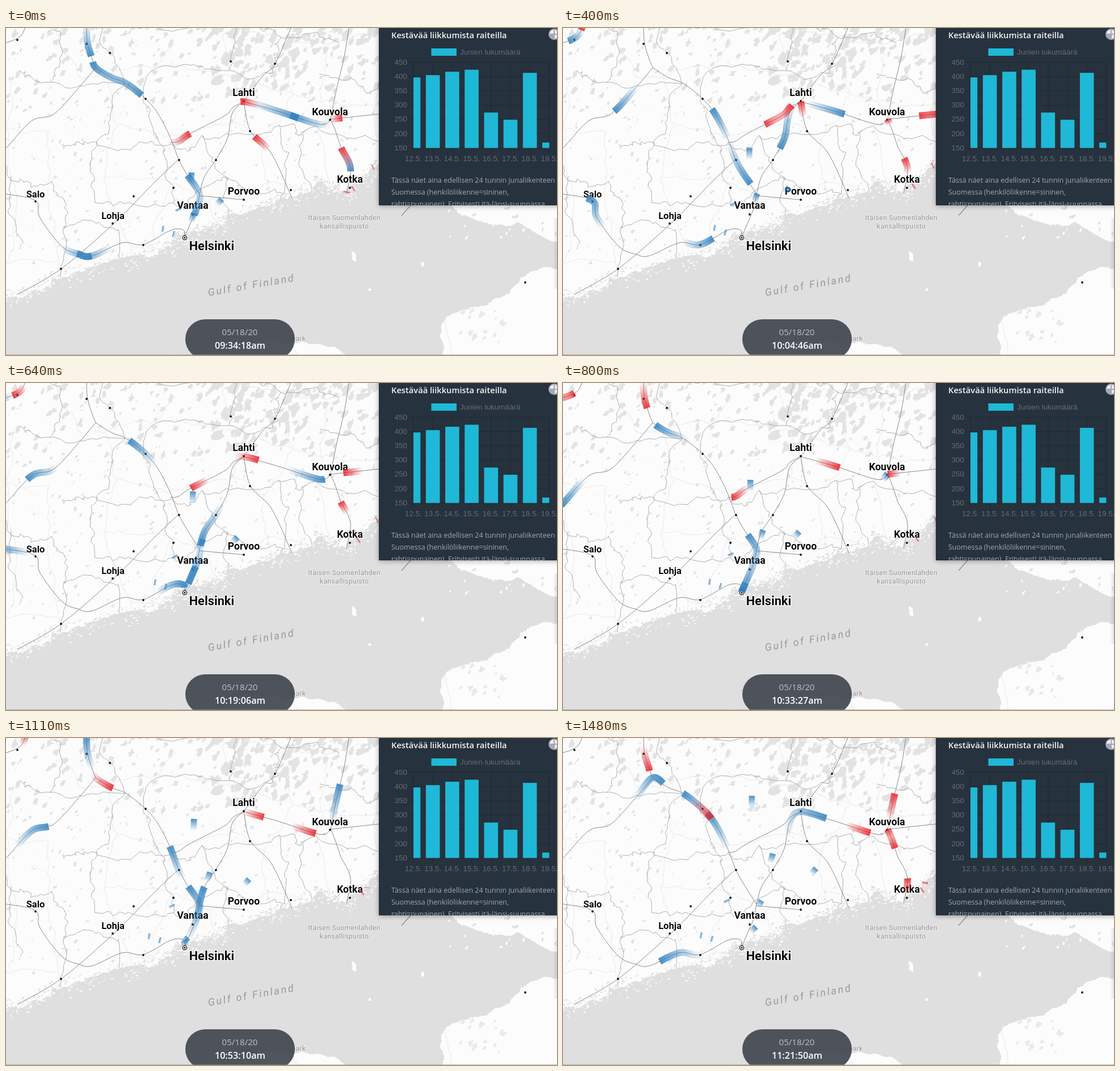
Recreate the animation shown at these times as an HTML page with a canvas. Size 971 px wide and 577 px high, loop 1.53 s.

```html
<!DOCTYPE html>
<html lang="fi">
<head>
<meta charset="utf-8">
<title>Junaliikenne</title>
<style>
  html, body { margin: 0; width: 100%; height: 100%; overflow: hidden; background: #fcfcfc; }
  canvas, svg { position: absolute; left: 0; top: 0; width: 971px; height: 577px; display: block; }
  .town { font: 700 17.6px Roboto, sans-serif; fill: #0a0a0a; text-anchor: middle;
          stroke: #fff; stroke-width: 2.5px; stroke-linejoin: round; paint-order: stroke; }
  .park { font: 500 12.5px Roboto, sans-serif; fill: #a3a3a3; text-anchor: middle; letter-spacing: .15px;
          stroke: #f4f4f4; stroke-width: 1.5px; paint-order: stroke; }
  .sea { font: italic 400 18px Roboto, sans-serif; fill: #999; letter-spacing: 2.8px; }
  .ui { font-family: "Open Sans", sans-serif; }
  .axis { font: 13.5px "Liberation Sans", Arial, sans-serif; fill: #666b72; }
</style>
</head>
<body>
<canvas id="map" width="971" height="577"></canvas>
<svg id="labels" viewBox="0 0 971 577"></svg>
<canvas id="trains" width="971" height="577"></canvas>
<svg id="ui" viewBox="0 0 971 577">
  <defs>
    <filter id="shade" x="-10%" y="-10%" width="120%" height="120%">
      <feDropShadow dx="0" dy="1" stdDeviation="5" flood-opacity=".35"/>
    </filter>
    <clipPath id="panelClip"><rect x="657" width="314" height="313"/></clipPath>
    <linearGradient id="edge"><stop stop-color="#000" stop-opacity="0"/><stop offset="1" stop-color="#000" stop-opacity=".1"/></linearGradient>
  </defs>
  <rect x="964" y="335" width="7" height="125" fill="url(#edge)"/>
  <path d="M971 359l-4 4 4 4" fill="none" stroke="#aaa"/>
  <rect x="657" y="-12" width="330" height="325" fill="#28303c" filter="url(#shade)"/>
  <g id="chart" clip-path="url(#panelClip)"></g>
  <circle cx="966" cy="11" r="10" fill="#a4a9b6"/>
  <path d="M965 10v-7a8 8 0 0 0-7 7zM967 12v7a8 8 0 0 0 6-7zM967 10v-7a8 8 0 0 1 6 7z" fill="#e9ebf0"/>
  <rect x="316" y="514" width="193" height="70" rx="35" fill="#454a53" fill-opacity=".94"/>
  <g class="ui" text-anchor="middle">
    <text x="412" y="542" font-size="15.1" fill="#bfc3c8">05/18/20</text>
    <text id="clock" x="412.5" y="566" font-size="16.2" font-weight="600" fill="#fff"></text>
  </g>
  <path d="M0 576.5h971" stroke="#8d8f93" stroke-opacity=".6"/>
</svg>
<script>
const $ = id => document.getElementById(id);
const BLUE = '49,128,190', RED = '231,32,38';

let seed = 20;
const rnd = () => {
  seed = (seed + 0x6D2B79F5) | 0;
  let t = Math.imul(seed ^ seed >>> 15, 1 | seed);
  t = t + Math.imul(t ^ t >>> 7, 61 | t) ^ t;
  return ((t ^ t >>> 14) >>> 0) / 4294967296;
};
const span = (a, b) => a + rnd() * (b - a);
const times = (n, f) => Array.from({ length: n }, (_, i) => f(i));
const pairs = flat => times(flat.length / 2, i => [flat[2 * i], flat[2 * i + 1]]);
const mix = (a, b, t) => [a[0] + (b[0] - a[0]) * t, a[1] + (b[1] - a[1]) * t];

// Catmull-Rom through the points, with running length in the third slot
function smooth(p) {
  const out = [];
  let len = 0;
  for (let i = 0; i < p.length - 1; i++) {
    const a = p[i - 1] || p[i], b = p[i], c = p[i + 1], d = p[i + 2] || c;
    const n = Math.ceil(Math.hypot(c[0] - b[0], c[1] - b[1]) / 2);
    for (let k = i ? 1 : 0; k <= n; k++) {
      const t = k / n, last = out[out.length - 1];
      const [x, y] = [0, 1].map(j => .5 * (2 * b[j] + (c[j] - a[j]) * t +
        (2 * a[j] - 5 * b[j] + 4 * c[j] - d[j]) * t * t + (3 * b[j] - a[j] - 3 * c[j] + d[j]) * t ** 3));
      if (last) len += Math.hypot(x - last[0], y - last[1]);
      out.push([x, y, len]);
    }
  }
  return out;
}

// Jagged line by midpoint displacement
function rough(p, amp, depth = 4) {
  for (; depth--; amp *= .62) {
    p = p.flatMap((b, i) => {
      if (!i) return [b];
      const m = mix(p[i - 1], b, .5);
      return [[m[0] + span(-amp, amp), m[1] + span(-amp, amp)], b];
    });
  }
  return p;
}

// Railway sections, each from its first station to the next
const tracks = {};
const track = (name, ...flat) => { tracks[name] = pairs(flat); };
track('tampere', 142,-90, 142,0, 144,28, 151,52, 158,70);
track('toijala', 158,70, 185,87, 212,98, 245,124, 267,150, 288,190, 304,232);
track('kerava', 304,232, 318,257, 341,293);
track('helsinki', 341,293, 336,318, 328,338, 315,368);
track('turku', 158,70, 126,108, 84,152, 45,164, 0,212, -40,250);
track('lahti', 341,293, 350,262, 370,232, 390,195, 399,150, 419,130);
track('kouvola', 419,130, 480,147, 553,170, 572,161);
track('freight', 290,202, 304,200, 325,186, 385,155, 400,140, 419,130);
track('east', 572,161, 656,152, 720,146);
track('junction', 572,161, 580,180, 590,210);
track('kotka', 590,210, 607,247, 600,292);
track('savo', 572,161, 582,110, 598,40, 612,-60);
track('south', 419,130, 431,182, 468,222, 504,300);
track('coast', -80,285, 0,293, 52,305, 60,335, 98,385, 128,399, 152,402, 205,379, 242,382, 290,357, 312,356, 315,368);
track('west', -40,36, 0,26, 20,18, 30,8, 40,-20);
track('hanko', 20,470, 97,425, 190,345, 262,272, 304,232);
track('porvoo', 341,296, 385,300, 419,303);
track('heinola', 419,130, 452,85, 474,63, 502,0);

// Sections joined in order; a minus runs one backwards
const route = names => smooth(names.split(' ').flatMap((name, i) => {
  const p = name[0] === '-' ? [...tracks[name.slice(1)]].reverse() : tracks[name];
  return i ? p.slice(1) : p;
}));

function drawMap() {
  const LAND = '#fcfcfc', SEA = '#dfdfdf', LAKE = '#e3e3e3';
  const g = $('map').getContext('2d');
  const trace = p => { g.beginPath(); p.forEach(([x, y]) => g.lineTo(x, y)); };
  const fill = (p, c) => { trace(p); g.fillStyle = c; g.fill(); };
  const line = (p, c, w) => { trace(p); g.strokeStyle = c; g.lineWidth = w; g.stroke(); };
  const disc = (x, y, r, c) => { g.beginPath(); g.arc(x, y, r, 0, 7); g.fillStyle = c; g.fill(); };
  const blob = (x, y, r, c, stretch = 1.7, tilt = span(-1.3, -.4)) => fill(times(11, i => {
    const a = i / 11 * 2 * Math.PI, k = r * span(.45, 1.25), u = Math.cos(a) * k * stretch, v = Math.sin(a) * k;
    return [x + u * Math.cos(tilt) - v * Math.sin(tilt), y + u * Math.sin(tilt) + v * Math.cos(tilt)];
  }), c);
  // a net of wandering lines over the land
  const net = (size, chance, amp, color, width) => {
    const nodes = times(9, i => times(7, j => [(i - .3 + rnd() * .7) * size, (j - .3 + rnd() * .7) * size]));
    nodes.forEach((col, i) => col.forEach((a, j) => [nodes[i + 1] && nodes[i + 1][j], col[j + 1]].forEach(b => {
      if (b && rnd() < chance) line(rough([a, b], amp), color, width);
    })));
  };

  g.fillStyle = LAND;
  g.fillRect(0, 0, 971, 577);
  net(95, .8, 8, '#f2f2f2', 2);
  times(520, () => {
    const y = 420 * rnd() ** 1.5;
    blob(span(0, 660), y, y < 130 ? span(1, 5) : span(.6, 2.8), LAKE);
  });
  times(80, () => blob(span(365, 657), 120 * rnd() ** 1.6, span(3, 8), LAKE));
  net(92, .62, 15, '#9c9c9c', .8);

  // sea and shores
  const shore = pairs([0,478, 48,463, 85,441, 160,420, 235,402, 288,383, 303,370, 322,373, 345,356, 380,347, 398,327,
    460,315, 505,300, 556,270, 600,293, 613,272, 657,240]);
  const north = pairs([780,312, 803,331, 858,347, 905,344, 971,377]);
  const estonia = pairs([971,425, 925,428, 907,440, 884,469, 850,488, 795,502, 775,512, 765,545, 770,577]);
  const cape = pairs([600,577, 565,562, 500,556, 470,546, 390,570, 270,577]);
  fill([...rough(shore, 8), [657, 260], [780, 260], ...rough(north, 5), ...rough(estonia, 5), ...rough(cape, 5), [0, 577]], SEA);

  times(800, () => {
    const k = Math.floor(rnd() * (shore.length - 1)), p = mix(shore[k], shore[k + 1], rnd());
    const out = span(-13, 1) + 22 * rnd() ** 2;
    blob(p[0] + out * .4, p[1] + out, span(.5, 1.7), out > 2 ? LAND : SEA, 1.5, span(-1, .6));
  });
  blob(613, 402, 5, LAND, 2, 1.2);
  blob(735, 417, 3.5, LAND);
  blob(641, 461, 2.5, LAND);
  times(40, () => blob(span(780, 971), span(316, 372), span(.8, 3), rnd() < .55 ? LAND : SEA));
  times(17, () => blob(span(800, 880), span(492, 560), span(1.5, 5), '#e9e9e9', 1.6, -.9));
  line([[697, 331], [714, 312]], '#8a8a8a', 1.2);

  Object.values(tracks).forEach(p => line(smooth(p), '#858585', 1));

  pairs([20,21, 142,28, 183,44, 396,59, 474,63, 246,125, 419,129, 430,182, 571,162, 305,233, 370,233, 295,282, 225,297,
    52,306, 188,345, 419,303, 502,286, 606,282, 329,329, 242,383, 97,425, 915,449]).forEach(p => disc(...p, 1.9, '#111'));
  [[4.2, '#111'], [3, '#fff'], [1.6, '#111']].forEach(ring => disc(315, 370, ...ring));
}

function drawLabels() {
  const town = (name, x, y, size = 17.6) => `<text class="town" x="${x}" y="${y}" style="font-size:${size}px">${name}</text>`;
  const park = (name, x, y) => `<text class="park" x="${x}" y="${y}">${name}</text>`;
  $('labels').innerHTML = town('Lahti', 419, 120) + town('Kouvola', 571, 154) + town('Kotka', 606, 273) +
    town('Porvoo', 419, 294) + town('Vantaa', 329, 319) + town('Salo', 52, 299, 16.5) + town('Lohja', 188.5, 337, 16.5) +
    town('Helsinki', 362.5, 392, 21.8) + park('Itäisen Suomenlahden', 596, 339) + park('kansallispuisto', 596, 354) +
    park('Lahemaa rahvuspark', 468.5, 552) +
    '<text class="sea" transform="translate(357 473) rotate(-9.8)">Gulf of Finland</text>';
}

function drawChart() {
  const label = (s, x, y, anchor) => `<text class="axis" x="${x}" y="${y}" text-anchor="${anchor}">${s}</text>`;
  const grid = d => `<path d="${d}" stroke="#000" stroke-opacity=".2"/>`;
  const rect = (x, y, w, h) => `<rect x="${x}" y="${y}" width="${w}" height="${h}" fill="#1fb8d6"/>`;
  const text = (s, y, size, color, weight) =>
    `<text class="ui" x="679" y="${y}" font-size="${size}" fill="${color}" font-weight="${weight}">${s}</text>`;
  const yOf = value => 60.5 + (450 - value) * .504;
  let out = text('Kestävää liikkumista raiteilla', 18, 14.7, '#f4f5f6', 600);
  out += rect(749.5, 36, 44.5, 13) + label('Junien lukumäärä', 800, 46.5, 'start');
  for (let v = 450; v >= 150; v -= 50) out += grid(`M709 ${yOf(v)}H958`) + label(v, 707, yOf(v) + 4, 'end');
  [397, 405, 417, 424, 274, 249, 413, 169].forEach((count, i) => {
    const x = 718 + i * 34.2, left = i ? x - 12.3 : x, right = i < 7 ? x + 12.3 : x;
    out += grid(`M${x} 60V221`) + rect(left, yOf(count), right - left, yOf(150) - yOf(count)) +
      label(`${12 + i}.5.`, x, 234.5, 'middle');
  });
  ['Tässä näet aina edellisen 24 tunnin junaliikenteen', 'Suomessa (henkilöliikenne=sininen,',
   'rahti=punainen). Erityisesti itä-länsi-suunnassa'].forEach((s, i) => {
    out += text(s, 273 + i * 21, 12.5, '#a2a8af', 400);
  });
  $('chart').innerHTML = out;
}

// Time is counted in ticks of 215 seconds; a trail shows the last four.
const TAIL = 4;
const trains = [];

// Steady runs along a route, each given as departure and arrival
function run(names, color, ...trips) {
  const line = route(names), total = line[line.length - 1][2];
  const at = d => {
    const i = Math.max(1, line.findIndex(p => p[2] >= d)), [a, b] = [line[i - 1], line[i]];
    return mix(a, b, (d - a[2]) / (b[2] - a[2]));
  };
  for (const [leave, arrive] of trips) {
    const dist = u => total * Math.min(1, Math.max(0, (u - leave) / (arrive - leave)));
    trains.push({ color, width: 12, trail(u) {
      const head = dist(u), tail = dist(u - TAIL);
      const between = line.filter(p => p[2] > tail + .5 && p[2] < head - .5).reverse();
      return [at(head), ...between, at(tail)];
    } });
  }
}

// Straight creeping trains: place at time zero and speed per tick
function creep(color, x, y, vx, vy, from = -TAIL) {
  const at = u => [x + vx * u, y + vy * u];
  trains.push({ color, width: 10.5, trail: u => [at(Math.max(u, from)), at(Math.max(u - TAIL, from))] });
}

run('tampere toijala kerava helsinki', BLUE, [-12, 13.2]);
run('-helsinki -kerava -toijala -tampere', BLUE, [-18.6, 7.2], [-7.8, 27.5], [9.4, 44.4], [15.6, 45.2]);
run('kerava helsinki', BLUE, [-11, 4.1]);
run('tampere turku', BLUE, [-9.5, 20]);
run('-turku toijala', BLUE, [13.5, 41.5]);
run('-helsinki lahti kouvola', BLUE, [-16.5, 2.8], [17.6, 34.6]);
run('-kouvola -lahti helsinki', BLUE, [-3.6, 16.5]);
run('kouvola', BLUE, [3.8, 13.3]);
run('coast', BLUE, [-20, 13], [26, 50]);
run('-coast', BLUE, [-13.2, 16.1], [21.4, 46]);
run('junction kotka', BLUE, [-10, 4]);
run('savo', BLUE, [17.3, 30.3]);
run('-west', BLUE, [1.9, 14.5]);

run('tampere toijala kerava helsinki', RED, [4.8, 51.8], [16.7, 65]);
run('-kouvola -freight', RED, [-20, 17.3]);
run('freight kouvola', RED, [-3.5, 24.7]);
run('kouvola', RED, [18.8, 33]);
run('east', RED, [-2.5, 15.4]);
run('-east', RED, [-2.6, 15.2]);
run('-south', RED, [-14.8, 7.5]);
run('-kotka -junction', RED, [-8.7, 5.5]);
run('-kotka', RED, [-.5, 11.7], [23.5, 36]);
run('-junction', RED, [22.3, 27.6]);
run('junction', RED, [26, 31.8]);
run('savo', RED, [24.4, 44]);
run('west', RED, [7, 23.2]);
run('-west', RED, [5, 20]);

creep(BLUE, 327, 255, .2, -5.1);
creep(BLUE, 380, 302, 2.2, -2.4);
creep(BLUE, 331, 327, 1.3, -4.1);
creep(BLUE, 303, 319, -.5, -1.1);
creep(BLUE, 275, 354, -1.1, -.2);
creep(BLUE, 294, 363, -1.1, -.3);
creep(BLUE, 302, 365, 1.6, -2.6, 23);
creep(BLUE, 268, 405, 2.4, -2.4, 18);
creep(RED, 647, 245, .6, -.3);
creep(RED, 613, 283, .7, -.5);
creep(RED, 632, 290, .2, -1.2, 21);

const pen = $('trains').getContext('2d');
pen.lineJoin = 'round';
function drawTrains(u) {
  pen.clearRect(0, 0, 971, 577);
  for (const { color, width, trail } of trains) {
    const p = trail(u), head = p[0], tail = p[p.length - 1];
    if (Math.hypot(head[0] - tail[0], head[1] - tail[1]) < .5) continue;
    const fade = pen.createLinearGradient(...head, ...tail);
    fade.addColorStop(0, `rgba(${color},.86)`);
    fade.addColorStop(1, `rgba(${color},0)`);
    pen.strokeStyle = fade;
    pen.lineWidth = width;
    pen.beginPath();
    p.forEach(([x, y]) => pen.lineTo(x, y));
    pen.stroke();
  }
}

const pad = n => String(Math.floor(n)).padStart(2, '0');
const clock = s => `${pad(s / 3600)}:${pad(s / 60 % 60)}:${pad(s % 60)}am`;

const LOOP = 1530;
function ticks(ms) {
  if (ms < 20) return 0;
  if (ms < 980) return 1.5 + Math.floor((ms - 20) / 52);
  return 20 + Math.min(10, Math.floor((ms - 980) / 48));
}

let shown = -1;
function show(ms) {
  const u = ticks(ms);
  if (u === shown) return;
  shown = u;
  drawTrains(u);
  $('clock').textContent = clock(Math.round(34458 + u * 215.07));
}

drawMap();
drawLabels();
drawChart();
show(0);
let start;
requestAnimationFrame(function frame(now) {
  start ??= now;
  show(Math.max(0, now - start) % LOOP);
  requestAnimationFrame(frame);
});
</script>
</body>
</html>
```
